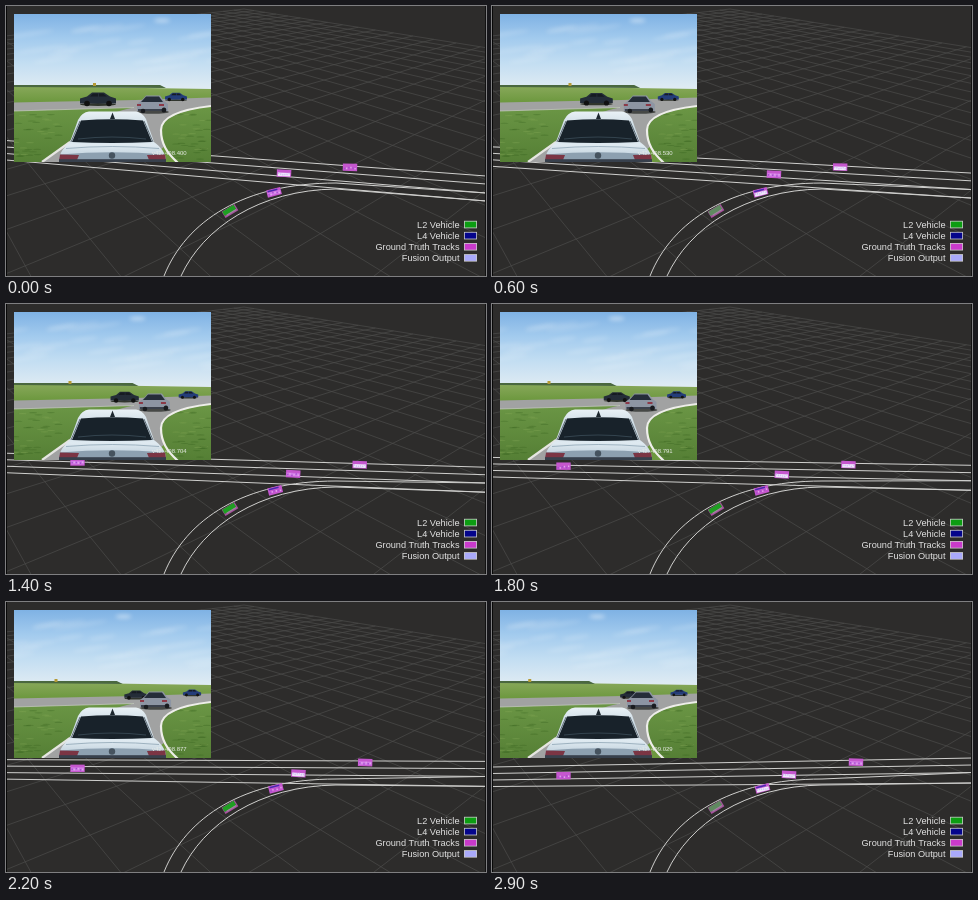
Animation of 480x270 px, one loop 3000 ms. Source, as an HTML page with a canvas:

```html
<!DOCTYPE html>
<html lang="en">
<head>
<meta charset="utf-8">
<title>Vehicle fusion view</title>
<style>
html, body { margin: 0; width: 100%; height: 100%; overflow: hidden; background: #2d2c2b; }
canvas { display: block; }
</style>
</head>
<body>
<canvas id="stage" width="480" height="270"></canvas>
<script>
const ctx = document.getElementById('stage').getContext('2d');
const LOOP = 3000, STEP = 100;
const mix = (a, b, k) => a + (b - a) * k;
const noise = n => { const v = Math.sin(n * 127.1 + 3.7) * 43758.5453; return v - Math.floor(v); };

function rect(x, y, w, h, fill) {
  ctx.fillStyle = fill;
  ctx.fillRect(x, y, w, h);
}

function path(d, stroke, width, fill) {
  const p = new Path2D(d);
  if (fill) { ctx.fillStyle = fill; ctx.fill(p); }
  if (stroke) { ctx.strokeStyle = stroke; ctx.lineWidth = width; ctx.stroke(p); }
}

const shape = (d, fill) => path(d, null, 0, fill);

function ellipse(x, y, rx, ry, fill, angle = 0) {
  ctx.beginPath();
  ctx.ellipse(x, y, rx, ry, angle, 0, Math.PI * 2);
  ctx.fillStyle = fill;
  ctx.fill();
}

function gradient(y0, y1, ...colors) {
  const g = ctx.createLinearGradient(0, y0, 0, y1);
  colors.forEach((c, i) => g.addColorStop(i / (colors.length - 1), c));
  return g;
}

// Ground plane seen in perspective: u runs down-left, v down-right.
function ground(u, v) {
  const a = u * 0.018, b = v * 0.025, depth = 1 - a - b;
  return [(238 - a * 795 + b * 156) / depth, (3 + (a + b) * 60) / depth];
}

function drawGrid() {
  ctx.beginPath();
  for (let u = 0; u <= 50; u++) {
    ctx.moveTo(...ground(u, 0));
    ctx.lineTo(...ground(u, (0.93 - u * 0.018) / 0.025));
  }
  for (let v = 0; v <= 36; v++) {
    ctx.moveTo(...ground(0, v));
    ctx.lineTo(...ground((0.93 - v * 0.025) / 0.018, v));
  }
  ctx.strokeStyle = '#4d4c4b';
  ctx.lineWidth = 0.7;
  ctx.stroke();
}

// The road turns about a far point; the ramp joins its two lower lines.
function drawRoads(k) {
  const color = '#cfcfcd';
  const right = [mix(170, 156, k), mix(178, 163, k), mix(187, 170.5, k), mix(195, 181, k)];
  right.forEach((y, i) => path(`M0 ${mix(134.5, 165, k) + i * 6.5}L480 ${y}`, color, 1));
  path(`M158 270C180 215 238 177 330 177L480 ${right[2]}`, color, 1);
  path(`M175 270C197 222 253 184 330 183L480 ${right[3]}`, color, 1);
}

function drawTrack(x, y, angle, id, step) {
  const seed = step * 7 + id * 13, mode = Math.floor(noise(seed) * 3);
  ctx.save();
  ctx.translate(x, y);
  ctx.rotate(angle);
  rect(-7.2, -3.7, 14.4, 7.4, '#c557ce');
  if (mode === 0) rect(-6.2, -0.5, 12.4, 3.5, '#f0e8fa');
  if (mode === 1) rect(-6.5, -1, 13, 3.5, '#d27be6');
  for (let i = 0; i < 6; i++) {
    const tint = mode === 0 ? '#d3bff5' : i % 2 ? '#e0a8ee' : '#a64cd0';
    rect(-6 + i * 2.1, -0.8 + noise(seed + i) * 1.8, 1.3, 1.6, tint);
  }
  if (id === 2) rect(-6, -2.8, 10, 1.4, '#4a2ab0');
  ctx.restore();
}

function drawEgo(step) {
  const faded = noise(step * 3 + 1) > 0.65;
  ctx.save();
  ctx.translate(224, 205);
  ctx.rotate(-0.55);
  rect(-7.5, -3.7, 15, 7.4, '#a8509f');
  rect(-7, -3.5, 13.4, 5, faded ? '#5f8a60' : '#1f9e22');
  rect(-5, 1.2, 11, 1.3, '#9b8a9b');
  ctx.restore();
}

function drawTracks(t, step) {
  const k = t / 2.9;
  drawTrack(mix(278, 297, k), mix(167.3, 172.6, k), 0.05, 0, step);
  drawTrack(mix(344, 364, k), mix(161.3, 160.2, k), 0.03, 1, step);
  drawTrack(mix(268, 270.5, k), 186.3, -0.25, 2, step);
  drawTrack(71.5, 158 + (t - 1.4) * 10.4, 0, 3, step);
  drawEgo(step);
}

function sideCar(x, y, w, body) {
  ctx.save();
  ctx.translate(x, y);
  ctx.scale(w / 36, w / 36);
  ellipse(0, 6, 18, 1.5, '#30352d');
  shape('M-18 5L-18 0L-11 -2L-6 -6H6L12 -2L18 0V5Z', body);
  shape('M-8 -2L-5 -5H0V-2ZM1 -2V-5H5L9 -2Z', '#161b22');
  ellipse(-11, 5, 2.8, 2.8, '#111');
  ellipse(11, 5, 2.8, 2.8, '#111');
  ctx.restore();
}

function drawSky(t) {
  rect(8, 8, 197, 76, gradient(8, 82, '#7fb2e4', '#a3cbee', '#c3def2', '#dfebf3'));
  ctx.save();
  ctx.translate(-17.5 * t, 0);
  ctx.filter = 'blur(2px)';
  for (let i = 0; i < 22; i++) {
    const x = 25 + i * 11, y = 22 + noise(i) * 40;
    ellipse(x, y, 14 + noise(i + 40) * 16, 1.8, 'rgba(255,255,255,.2)', -0.15);
  }
  ellipse(156, 14.5, 8, 1.8, 'rgba(255,255,255,.5)');
  ctx.restore();
}

function drawField(t) {
  shape('M8 80L205 83V157H8Z', gradient(80, 96, '#88a85a', '#6d983f'));
  const treeEnd = mix(160, 103, t / 2.9);
  shape(`M8 79H${treeEnd - 6}L${treeEnd} 82L8 81Z`, '#4a683f');
  rect(87 - 17.5 * t, 77, 3, 3, '#b59a35');
  shape('M8 96.5L130 94L205 91.5V101L140 156H8Z', '#a1a2a2');
  const grass = gradient(100, 156, '#6b9645', '#557f35');
  shape('M8 105L128 101.5C95 108 74 122 62 137L36 156H8Z', grass);
  shape('M205 100C175 104 156 112 155 124C154 137 161 148 172 156H205Z', grass);
  for (let i = 0; i < 70; i++) {
    const y = 108 + noise(i) * 46, left = i % 2;
    const x = left ? 8 + noise(i + 90) * 48 : 168 + noise(i + 90) * 35;
    const drift = left && y > 135 ? 0.5 : 1;
    ellipse(left ? 8 + (x - 8) * drift : x, y, 4, 0.6, i % 3 ? 'rgba(40,85,20,.25)' : 'rgba(150,185,100,.25)');
  }
  path('M205 100C174 103.5 155 111 155 124C155 138 161 147 172 157', '#eeeeea', 2.2);
  path('M36 156L64 136', '#e6e6e2', 2.2);
  path('M8 105L128 101.5', '#c9ccc4', 0.7);
}

function drawTraffic(t) {
  const k = t / 2.9;
  sideCar(187 - 17 * (1 - k) ** 2, 90.5, mix(22, 17, k), '#243d79');
  sideCar(92 + 22 * t - 2.1 * t * t, 92.5, mix(36, 20, k), '#242d38');
  ctx.save();
  ctx.translate(mix(146, 150, k), 98);
  ellipse(1, 8, 16, 1.8, '#464846');
  shape('M-15 7V0L-10 -4L-6 -8.5H8L12 -3L16 0V7Z', '#8d95a3');
  shape('M-11 -2L-6 -7.5H7L11 -2Z', '#252d39');
  rect(-15, 0, 4, 2, '#8b3947');
  rect(7, 0, 5, 2, '#8b3947');
  rect(-14, 5, 28, 2, '#3b414c');
  ellipse(-9, 7, 2.3, 2.3, '#191b1f');
  ellipse(12, 6, 2.3, 2.6, '#191b1f');
  ctx.restore();
}

function drawLeadCar() {
  shape('M53 156C53 147 58 141 64 136L72 114Q76 106 83 105.5H130Q136 106 140 113L148 136C155 141 160 147 160 156Z',
    gradient(105, 156, '#eaf2f6', '#c9d8e2', '#dfeaf1', '#b5c7d4'));
  shape('M75 114.5Q106 112 137 114.5L146 136Q106 138 66 136Z', '#18222a');
  path('M72 133Q106 129 140 133', '#3c4d58', 0.8);
  path('M74 115L65 136M138 115L147 136', '#46525c', 0.8);
  shape('M104 113L106.5 106.5L109 113Z', '#1d272e');
  path('M60 142.5Q106 138.5 153 142.5', '#8fa5b4', 0.8);
  shape('M54 148.5Q106 144 159 148.5L160 156H53Z', '#8da0b0');
  shape('M54 148.5L73 149L71 154H53Z', '#7b3544');
  shape('M159 148.5L141 149L143 154H160Z', '#7b3544');
  rect(53, 153.2, 107, 2.8, '#37404c');
  ellipse(106, 149.5, 3.2, 3.2, '#46535f');
}

function drawCamera(t) {
  ctx.save();
  ctx.beginPath();
  ctx.rect(8, 8, 197, 148);
  ctx.clip();
  drawSky(t);
  drawField(t);
  drawTraffic(t);
  drawLeadCar();
  ctx.font = '6px "Liberation Sans", Arial, sans-serif';
  ctx.textAlign = 'left';
  ctx.fillStyle = '#e8ece8';
  ctx.fillText('v42: ' + (408.4 + t * 0.217).toFixed(3), 146, 148.5);
  ctx.restore();
}

function drawLegend() {
  const rows = [['L2 Vehicle', '#0c9d12'], ['L4 Vehicle', '#05058c'],
    ['Ground Truth Tracks', '#c93acb'], ['Fusion Output', '#a9a9fa']];
  ctx.font = '9.2px "Liberation Sans", Arial, sans-serif';
  ctx.textAlign = 'right';
  rows.forEach(([label, color], i) => {
    const y = 218.3 + i * 11.1;
    ctx.fillStyle = '#e2e2e2';
    ctx.fillText(label, 453.5, y + 3.3);
    rect(458, y - 3.5, 13, 7.5, '#c8c8c8');
    rect(458.8, y - 2.7, 11.4, 5.9, color);
  });
}

function draw(now) {
  const step = Math.floor((now % LOOP) / STEP), t = step * STEP / 1000;
  rect(0, 0, 480, 270, '#2d2c2b');
  drawGrid();
  drawRoads(t / 2.9);
  drawTracks(t, step);
  drawCamera(t);
  drawLegend();
  rect(0, 0, 1, 270, '#080808');
  rect(479, 0, 1, 270, '#111');
  requestAnimationFrame(time => draw(time - start));
}

const start = performance.now();
draw(0);
</script>
</body>
</html>
```
